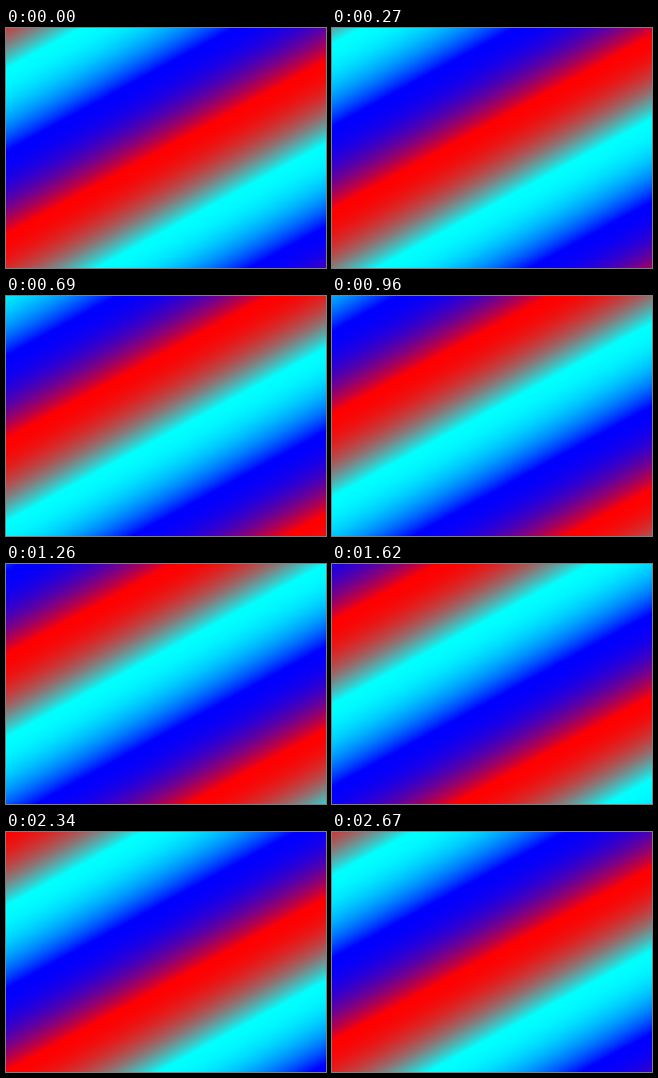
An HTML page with a canvas that plays this animation: 400 px wide and 300 px high, repeating every 2700 ms.

```html
<!DOCTYPE html>
<html>
<head>
<meta charset="utf-8">
<style>
html, body { margin: 0; width: 100%; height: 100%; overflow: hidden; background: #00f; }
canvas { display: block; }
</style>
</head>
<body>
<canvas id="stage" width="400" height="300"></canvas>
<script>
const WIDTH = 400, HEIGHT = 300;
const LOOP = 2700, STEP = 30;
const PERIOD = 310.5;  // vertical distance between equal stripes
const SLOPE = 0.542;   // rise of the stripes per pixel
const ORIGIN = 257;    // height of pure red on the left edge at the start
const STOPS = [[255, 0, 0], [0, 255, 255], [0, 0, 255]];
const SHADES = 2048;

const ctx = document.getElementById('stage').getContext('2d');
const image = ctx.createImageData(WIDTH, HEIGHT);
const pixels = new Uint32Array(image.data.buffer);

// Each colour eases into the next: slow at first, then a crisp edge.
function shade(phase) {
  const position = phase * STOPS.length;
  const index = Math.floor(position);
  const mix = (position - index) ** 2;
  const next = STOPS[(index + 1) % STOPS.length];
  const [r, g, b] = STOPS[index].map((c, i) => Math.round(c + (next[i] - c) * mix));
  return (255 << 24 | b << 16 | g << 8 | r) >>> 0;
}

const palette = Uint32Array.from({ length: SHADES }, (_, i) => shade(i / SHADES));

function draw(time) {
  const shift = time / LOOP + 1;
  for (let y = 0, i = 0; y < HEIGHT; y++) {
    for (let x = 0; x < WIDTH; x++, i++) {
      const phase = (y + SLOPE * x - ORIGIN) / PERIOD + shift;
      pixels[i] = palette[Math.floor(phase * SHADES) % SHADES];
    }
  }
  ctx.putImageData(image, 0, 0);
}

const start = performance.now();
function tick() {
  const elapsed = (performance.now() - start) % LOOP;
  draw(Math.floor(elapsed / STEP) * STEP);
  requestAnimationFrame(tick);
}
tick();
</script>
</body>
</html>
```
